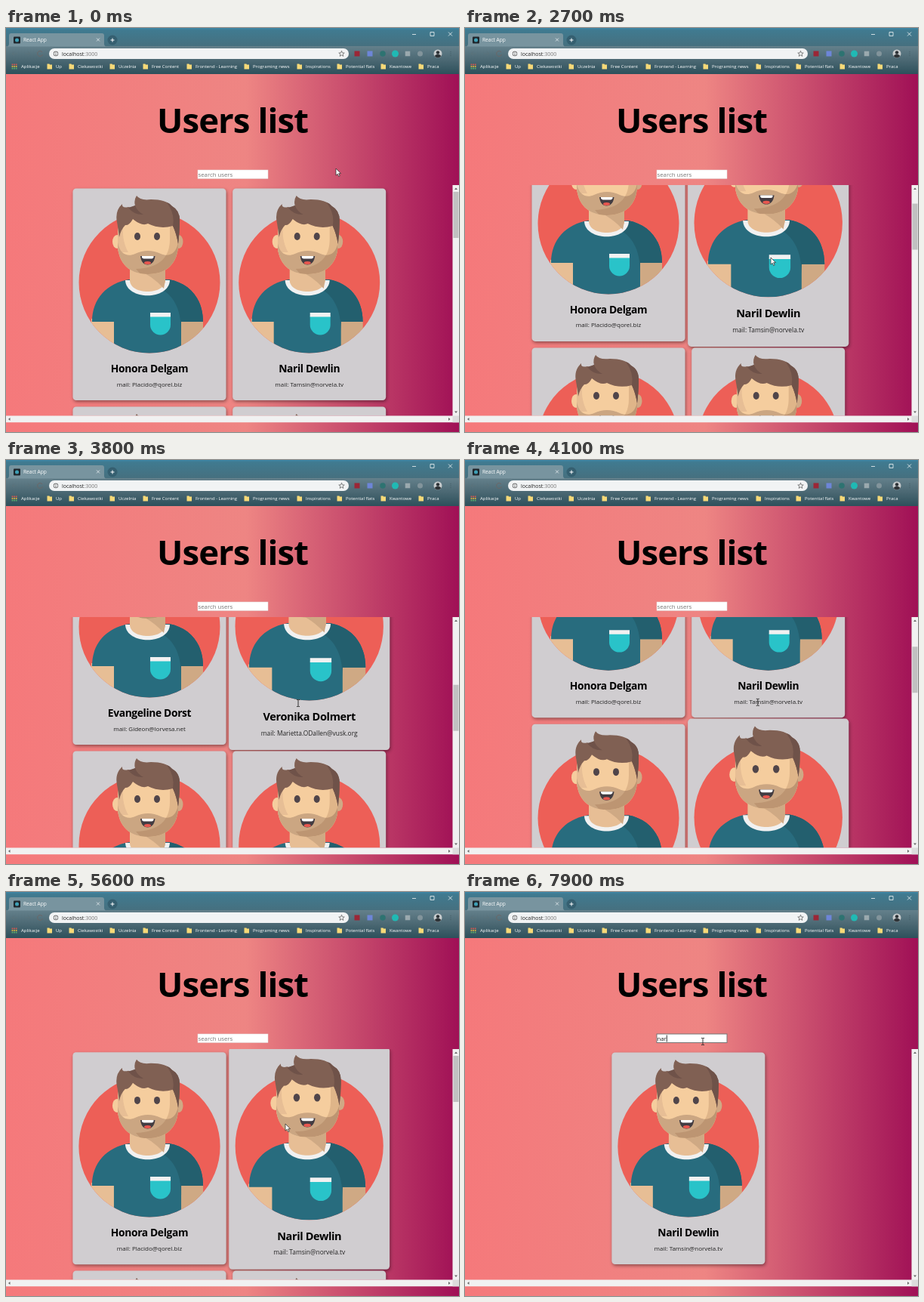
Write an HTML page that moves like this. It is 600 px wide and 535 px high and loops after 8000 ms.

```html
<!DOCTYPE html>
<html lang="en">
<head>
<meta charset="utf-8">
<title>React App</title>
<style>
  html, body { margin: 0; width: 100%; height: 100%; overflow: hidden; }
  svg { display: block; width: 600px; height: 535px; font-family: "Open Sans", "Noto Sans", sans-serif; }
  .card { fill: #d0cdd0; filter: drop-shadow(1.5px 2px 2px #0006); }
  .name { font-weight: 700; font-size: 13.8px; letter-spacing: -.35px; text-anchor: middle; }
  .mail { font-size: 8px; fill: #222; text-anchor: middle; }
</style>
</head>
<body>
<svg viewBox="0 0 600 535">
  <defs>
    <linearGradient id="page">
      <stop stop-color="#f5797b"/><stop offset=".53" stop-color="#ee8583"/><stop offset="1" stop-color="#a01056"/>
    </linearGradient>
    <linearGradient id="frame" x2="0" y2="1">
      <stop stop-color="#3c86a6"/><stop offset=".12" stop-color="#407a90"/><stop offset="1" stop-color="#466f7e"/>
    </linearGradient>
    <linearGradient id="bar" x2="0" y2="1">
      <stop stop-color="#64808b"/><stop offset=".5" stop-color="#4b6873"/><stop offset="1" stop-color="#2d505b"/>
    </linearGradient>
    <clipPath id="view"><path d="M0 208H591.500V513.500H0Z"/></clipPath>
    <clipPath id="disc"><path d="M90 200H290V337H283.500A93.500 93.500 0 0 1 96.500 337H90Z"/></clipPath>
    <clipPath id="faceClip"><path d="M148 268Q152 245 188 245T228 268V286C228 312 212 326 188 326S148 312 148 286Z"/></clipPath>

    <g id="avatar">
      <circle cx="190" cy="337" r="93.500" fill="#ed5f57"/>
      <g clip-path="url(#disc)">
        <path d="M113 385H144V431H113Z" fill="#e7be95"/>
        <path d="M231 385H261V431H231Z" fill="#cfa984"/>
        <path d="M114 389C114 358 134 338 163 333H216C243 338 261 358 261 389H232V431H143V389Z" fill="#286c7e"/>
        <path d="M200 343C222 352 232 372 232 402V389H261C261 358 243 338 216 333Z" fill="#235f6e"/>
        <path d="M158 334C159 361 216 361 217 334Z" fill="#f1f1f1"/>
        <path d="M164 300H211V334C211 354 164 354 164 334Z" fill="#e7be95"/>
        <path d="M170 318Q194 328 209 345L211 334V300H170Z" fill="#cfa984"/>
        <path d="M191 381H218V393A13.500 13.500 0 0 1 191 393Z" fill="#29c3c9"/>
        <path d="M191 377H218V382.500H191Z" fill="#f1f1f1"/>
      </g>
      <ellipse cx="147" cy="283" rx="6" ry="9" fill="#f5cd9e"/>
      <ellipse cx="229" cy="283" rx="5.500" ry="9" fill="#d0a985"/>
      <g clip-path="url(#faceClip)">
        <path d="M148 235H228V326H148Z" fill="#f5cd9e"/>
        <path d="M148 255H156Q152 280 162 297H148Z" fill="#e7be95"/>
        <path d="M148 284C151 301 162 303 171 299Q188 291 205 299C214 303 225 301 228 284V326H148Z" fill="#cba682"/>
        <path d="M217 240V280C217 305 202 318 172 319L180 328H228V240Z" fill="#7d4a2a" opacity=".18"/>
      </g>
      <path d="M178 302H197.500C196.500 309.500 193 313.500 187.500 313.500S179 309.500 178 302Z" fill="#423c42"/>
      <path d="M180 302H195.500V303.700Q195 305.500 193 305.500H182.500Q180.500 305.500 180 303.700Z" fill="#fff"/>
      <ellipse cx="187.500" cy="311" rx="4.500" ry="2" fill="#e8574f"/>
      <g fill="#50454a"><ellipse cx="174" cy="276" rx="4" ry="5"/><ellipse cx="200" cy="276" rx="4" ry="5"/></g>
      <path d="M150 277Q148 262 147 257Q144 242 154 233Q153 239 162 237Q166 239 171 235Q169 228 173 222Q178 229 192 227Q212 227 220 236Q231 242 230 257Q230 270 228 286Q226 273 221 262Q204 267 188 259Q180 263 168 253Q163 262 158 261Q152 267 150 277Z" fill="#806053"/>
      <path d="M213 231Q217 232 220 236Q231 242 230 257Q230 270 228 286Q226 273 221 262Q224 246 213 231ZM162 238Q170 248 182 247Q174 243 171 235Z" fill="#6f5249"/>
    </g>
  </defs>

  <rect width="600" height="535" fill="url(#page)"/>
  <g id="chrome"></g>
  <text x="300" y="138.500" text-anchor="middle" font-size="45.500" font-weight="700" letter-spacing="-.9">Users list</text>
  <rect id="box" x="254" y="188" width="93" height="11.500" fill="#fff"/>
  <text id="query" x="254.500" y="196.800" font-size="7.800"></text>
  <path id="caret" d="M267.500 189.500V198.500" stroke="#000" stroke-width=".8"/>
  <g clip-path="url(#view)"><g id="list"></g></g>
  <path d="M591.500 208H600V522.300H0V513.500H591.500Z" fill="#f1f1f1"/>
  <path d="M591.500 513.500H600V522.300H591.500Z" fill="#dcdcdc"/>
  <rect id="thumb" x="592.500" width="7" fill="#c1c1c1"/>
  <path d="M594 214L596 211.500L598 214ZM594 507.500L596 510L598 507.500ZM5.500 516L3 518L5.500 520ZM586 516L588.500 518L586 520Z" fill="#666"/>
  <path id="arrow" d="M0 0V9.200L2.200 7.300L3.700 10.600L5.200 9.900L3.700 6.700H6.500Z" fill="#fff" stroke="#222" stroke-width=".7"/>
  <path id="beam" d="M-2 -4.500H-.5L0 -4L.5 -4.500H2M0 -4V4M-2 4.500H-.5L0 4L.5 4.500H2" fill="none" stroke="#222" stroke-width=".9"/>
</svg>

<script>
const $ = id => document.getElementById(id);
const text = (x, y, size, str, fill = '#fff') => `<text x="${x}" y="${y}" font-size="${size}" fill="${fill}">${str}</text>`;
const path = (d, stroke, width = .8) => `<path d="${d}" fill="none" stroke="${stroke}" stroke-width="${width}"/>`;
const dot = (x, y, r, fill) => `<circle cx="${x}" cy="${y}" r="${r}" fill="${fill}"/>`;
const square = (x, y, s, fill) => `<rect x="${x - s / 2}" y="${y - s / 2}" width="${s}" height="${s}" fill="${fill}"/>`;

// Browser window
const bookmarks = [[66, 'Up'], [95, 'Ciekawostki'], [149, 'Uczelnia'], [193, 'Free Content'], [251, 'Frontend - Learning'],
  [327, 'Programing news'], [397, 'Inspirations'], [450, 'Potential flats'], [508, 'Kwantowe'], [558, 'Praca']];
const appColors = ['#e05a4e', '#e8b93c', '#5fb36a'];
let ui = `<rect width="600" height="25" fill="url(#frame)"/><rect y="24" width="600" height="37" fill="url(#bar)"/>
  <path d="M2 24.500Q4 24 4 21V10Q4 7 7 7H127Q130 7 130 10V21Q130 24 132 24.500Z" fill="#78949f"/>
  <rect x="10" y="11.500" width="9" height="9" rx="1" fill="#20262c"/>` + dot(14.5, 16, 2.5, '#3e9fb5')
  + text(23, 18.3, 6.6, 'React App')
  + path('M120 13.500L124 17.500M124 13.500L120 17.500', '#e6edf0') + dot(141, 16, 6.5, '#355f70')
  + path('M138.500 16H143.500M141 13.500V18.500', '#fff', 1)
  + path('M538 8.500H543M562 5.500H567V10.500H562ZM586 5.500L591 10.500M591 5.500L586 10.500', '#f3f6f7')
  + path('M15 34H8M11 31L8 34L11 37M25 34H32M29 31L32 34L29 37', '#5b717a')
  + path('M48 32A3.500 3.500 0 1 0 48.500 35', '#6c6767', 1)
  + '<rect x="57" y="27" width="397" height="14" rx="7" fill="#f1f3f4"/>'
  + dot(66, 34, 3.2, '#555') + dot(66, 34, 2.5, '#f1f3f4') + path('M66 33.500V36M66 32V32.800', '#555')
  + text(74, 36.6, 7, 'localhost<tspan fill="#777">:3000</tspan>', '#222')
  + path('M444.500 30.300L445.500 32.900L448.200 33L446.100 34.700L446.800 37.400L444.500 35.900L442.200 37.400L442.900 34.700L440.800 33L443.500 32.900Z', '#555', .7)
  + square(465, 34, 7, '#9b2636') + square(482, 34, 7, '#6d85d8') + dot(499, 34, 3.8, '#2d7371')
  + dot(515.5, 34, 4.5, '#20b9b4') + square(532, 34, 6.5, '#9aa9ae') + dot(548.5, 34, 3.5, '#82949b')
  + dot(572, 34, 5.5, '#c5cacc') + dot(572, 32.5, 2.2, '#2d3236')
  + '<path d="M567.500 37Q572 32.500 576.500 37Q572 42 567.500 37Z" fill="#2d3236"/>'
  + [31.5, 34, 36.5].map(y => dot(589, y, .7, '#48616b')).join('')
  + text(20, 53.2, 6, 'Aplikacje');
for (let i = 0; i < 9; i++) ui += square(8.5 + i % 3 * 2.6, 48.4 + (i / 3 | 0) * 2.6, 1.7, appColors[i / 3 | 0]);
for (const [x, label] of bookmarks)
  ui += `<path d="M${x - 11.5} 47.500H${x - 8.5}L${x - 8} 48.500H${x - 5}V54.500H${x - 11.5}Z" fill="#f6d978"/>` + text(x, 53.2, 6, label);
$('chrome').innerHTML = ui;

// User cards
const users = [
  ['Honora Delgam', 'Placido@qorel.biz'], ['Naril Dewlin', 'Tamsin@norvela.tv'],
  ['Evangeline Dorst', 'Gideon@lorvesa.net'], ['Veronika Dolmert', 'Marietta.ODallen@vusk.org'],
  ['Shelbie Kronfeld', 'Cormac_Bryde@anselo.ca'], ['Mr. Anselm Prouvist', 'Delphia_Orsk@jarvol.info'],
  ['Jostin Wehrmelt', 'Orlan.Pryce@bellev.io'], ['Theobald Margrudsetter V', 'Garrick.N@rosamel.me'],
  ['Brenna Walchert', 'Halden_Voss@duvra.io'], ['Evangelisa DuMorel', 'Ansgar.Tolm@kerrin.biz']];
$('list').innerHTML = users.map(([name, mail]) => `<g><rect class="card" x="88.500" y="212.500" width="203" height="280.500" rx="4.500"/>
  <use href="#avatar"/><text class="name" x="190" y="455.700">${name}</text><text class="mail" x="190" y="474.500">mail: ${mail}</text></g>`).join('');
const cards = [...$('list').children];

// Motion: rows of [time, values...]
const pointer = [[0, 437, 186], [1800, 463, 175], [2450, 405, 304], [3100, 405, 304], [3800, 387, 322],
  [4500, 389, 319], [4700, 387, 319], [5100, 255, 312], [5150, 255, 312], [5600, 370, 307], [6100, 362, 280], [6600, 315, 198]];
const scroll = [[2450, 0], [3100, 203], [3700, 405], [3850, 405], [4250, 0]];
const hovers = [[1, 2200, 3250], [3, 3250, 4150], [1, 4150, 4950], [0, 4950, 5330], [1, 5330, 6450]]; // card, enter, leave
const typing = [[7150, 'n'], [7350, 'na'], [7550, 'nar']];
const LOOP = 8000, ROW = 289, COL = 211.7, VIEW = 306, TRACK = 288;

const linear = p => Math.min(1, Math.max(0, p));
const ease = p => (p = linear(p), p * p * (3 - 2 * p));
function at(keys, t, curve) {
  const i = keys.findIndex(k => k[0] > t);
  if (i < 0) return keys[keys.length - 1].slice(1);
  if (!i) return keys[0].slice(1);
  const a = keys[i - 1], b = keys[i], p = curve((t - a[0]) / (b[0] - a[0]));
  return a.slice(1).map((v, j) => v + (b[j + 1] - v) * p);
}
const show = (el, on) => el.setAttribute('visibility', on ? 'visible' : 'hidden');
const move = (el, x, y, more = '') => el.setAttribute('transform', `translate(${x} ${y})${more}`);

function draw(t) {
  const [x, y] = at(pointer, t, ease), [top] = at(scroll, t, linear);
  const query = typing.reduce((s, [time, str]) => t >= time ? str : s, '');
  const focus = t >= 6800;

  const found = cards.filter((c, i) => users[i][0].toLowerCase().includes(query));
  cards.forEach((card, i) => {
    const n = found.indexOf(card);
    show(card, n >= 0);
    if (n < 0) return;
    const alone = n % 2 === 0 && n === found.length - 1;
    let grow = 0;
    for (const [id, enter, leave] of hovers)
      if (id === i) grow += ease((t - enter) / 300) - ease((t - leave) / 300);
    move(card, alone ? COL / 2 : n % 2 * COL, (n >> 1) * ROW - top, ` translate(190 352.8) scale(${1 + .05 * grow}) translate(-190 -352.8)`);
  });

  const height = Math.ceil(found.length / 2) * ROW;
  show($('thumb'), height > VIEW);
  $('thumb').setAttribute('y', 217 + top * TRACK / height);
  $('thumb').setAttribute('height', VIEW * TRACK / height);

  $('box').setAttribute('stroke', focus ? '#777' : '#ddd');
  $('box').setAttribute('stroke-width', focus ? 1 : .5);
  $('query').textContent = query || 'search users';
  $('query').setAttribute('fill', query ? '#222' : '#777');
  show($('caret'), focus && (query || (t - 6800) % 1000 < 500));
  move($('caret'), query ? $('query').getComputedTextLength() - 12.5 : -12.7, 0);

  const beam = t >= 2900 && t < 4150 || t >= 6500;
  show($('beam'), beam);
  show($('arrow'), !beam);
  move($('beam'), x, y);
  move($('arrow'), x, y);
}

const start = performance.now();
function tick() {
  const t = (performance.now() - start) % LOOP;
  draw(Math.floor(t / 100) * 100);
  requestAnimationFrame(tick);
}
tick();
</script>
</body>
</html>
```
